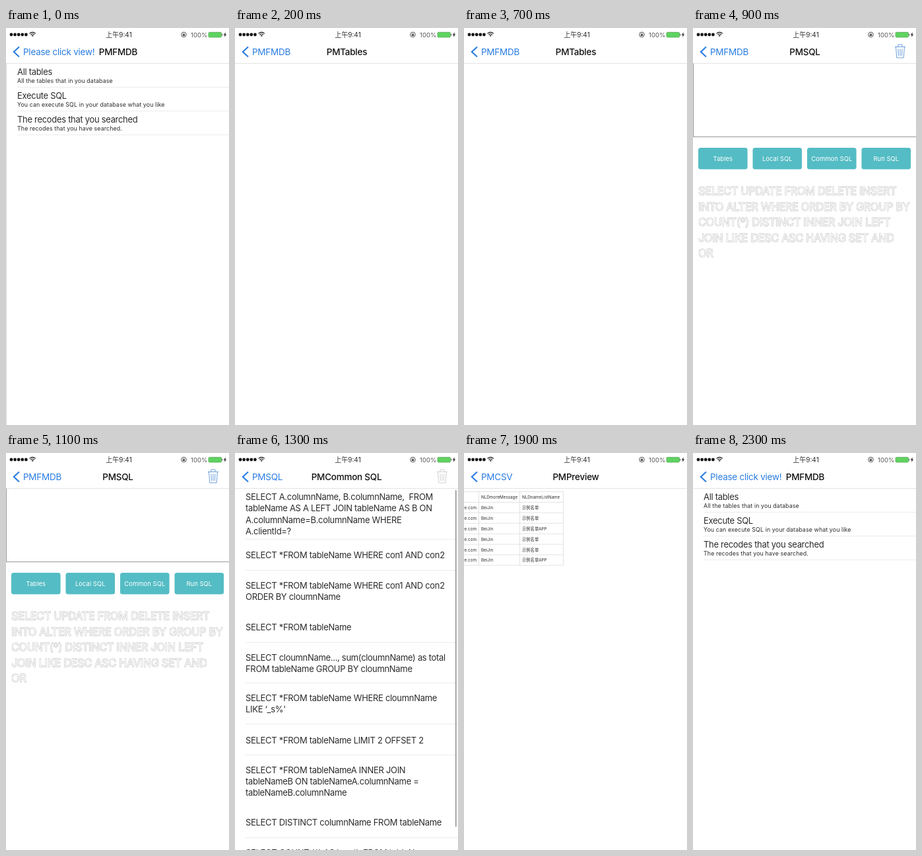
Animation, 338 px wide and 600 px high, one loop 2.4 s. Source, as an HTML page:

```html
<!DOCTYPE html>
<html lang="en">
<head>
<meta charset="utf-8">
<title>Database browser demo</title>
<style>
html, body { margin: 0; width: 100%; height: 100%; overflow: hidden; background: #fff; }
svg { display: block; width: 338px; height: 600px; }
text { font-family: Inter, "Noto Sans CJK SC", "Noto Sans CJK", sans-serif; white-space: pre; fill: #2c2c2c; }
.nav { font-size: 13.5px; letter-spacing: -.25px; }
.title { font-weight: 500; text-anchor: middle; fill: #111; }
.back { fill: #2a7de1; }
.row { font-size: 13px; letter-spacing: -.31px; }
.sub { font-size: 8.9px; letter-spacing: .09px; }
.cell { font-size: 6.3px; }
.mid { text-anchor: middle; }
.button { font-size: 9.5px; text-anchor: middle; fill: #fff; }
.keyword { font-size: 16px; letter-spacing: -.13px; fill: #fff; stroke: #acacb0; stroke-width: .9px; paint-order: stroke; }
</style>
</head>
<body>
<svg id="stage" viewBox="0 0 338 600" xmlns="http://www.w3.org/2000/svg"></svg>
<script>
const LOOP = 2400, STEP = 100;
const BLUE = '#2a7de1', GRAY = '#8c8c8c', PALE = '#e8e8ea';
const stage = document.getElementById('stage');

const text = (x, y, cls, str, extra = '') => `<text x="${x}" y="${y}" class="${cls}" ${extra}>${str}</text>`;
const path = (d, color, width = 1) =>
  `<path d="${d}" fill="none" stroke="${color}" stroke-width="${width}"/>`;
const rect = (x, y, w, h, fill, r = 0) =>
  `<rect x="${x}" y="${y}" width="${w}" height="${h}" rx="${r}" fill="${fill}"/>`;
const each = (list, draw) => list.map(draw).join('');

const lens = (x, y, r, color, width) =>
  `<circle cx="${x}" cy="${y}" r="${r}" fill="none" stroke="${color}" stroke-width="${width}"/>` +
  path(`M${x + r * .72} ${y + r * .72}l${r * .95} ${r * .95}`, color, width);

const trash = color => path(
  'M306 28.5h16M311 28v-3h6v3M307.5 28.5l1.3 16.5h10.4l1.3-16.5M311 31.5l.5 10.5M314 31.5v10.5M317 31.5l-.5 10.5',
  color, 1);

function statusBar() {
  const dots = each([8, 13.6, 19.2, 24.8, 30.4], x => `<circle cx="${x}" cy="10" r="2.4" fill="#111"/>`);
  return rect(0, 0, 338, 18, '#fff') + dots +
    path('M35.6 8.4Q40.2 4.4 44.8 8.4M37.4 10.2Q40.2 7.8 43 10.2', '#111', 1.2) +
    '<path d="M38.6 11.3Q40.2 10 41.8 11.3L40.2 13Z" fill="#111"/>' +
    text(171, 13.6, 'mid', '上午9:41', 'font-size="10"') +
    '<circle cx="269.5" cy="10" r="3.8" fill="none" stroke="#444" stroke-width=".9"/>' +
    rect(267.8, 9.4, 3.4, 2.6, '#444') + path('M268.5 9.5v-1q1-1.3 2 0v1', '#444', .7) +
    text(280, 13.5, '', '100%', 'font-size="9.6" style="fill:#555"') +
    '<rect x="307" y="6.4" width="19.5" height="7.6" rx="1.5" fill="#5fd35f" stroke="#58a75c" stroke-width=".8"/>' +
    rect(327.1, 8.8, 1.2, 2.8, '#777') +
    '<path d="M332.8 6.2L329.8 10.6H331.7L330.9 14L334.2 9.4H332.2Z" fill="#222"/>';
}

function navBar({ back, title, center = 169.5, icon = '', fading = false }) {
  return rect(0, 18, 338, 35, '#fff') + path('M0 53.5H338', '#dcdcde', .8) +
    path('M20 28.5L11.8 36L20 43.5', fading ? '#b5d3f5' : BLUE, 2.1) +
    text(fading ? 28 : 26, 40.8, 'nav back', back) +
    text(center, 40.8, 'nav title', title) + icon;
}

function menuBody() {
  const rows = [
    ['All tables', 'All the tables that in you database'],
    ['Execute SQL', 'You can execute SQL in your database what you like'],
    ['The recodes that you searched', 'The recodes that you have searched.']
  ];
  return each(rows, ([head, sub], i) => {
    const y = 71.3 + i * 36;
    return text(16, y, 'row', head) + text(16, y + 11.7, 'sub', sub) +
      path(`M16 ${y + 18.2}H340`, PALE, .8);
  });
}

function table(dx, dy) {
  const edges = [-11, 54, 116, 182], rowHeight = 15.9, top = 94.5;
  const rows = [['NLDname', 'NLDmoreMessage', 'NLDnameListName']];
  for (let i = 0; i < 6; i++)
    rows.push(['mail@example.com', 'BeiJin', '示例名单' + (i % 3 === 2 ? 'APP' : '')]);
  let out = each(edges, x => path(`M${x - .5} ${top}v${rowHeight * 7}`, '#dcdcdc', .8));
  for (let i = 0; i <= 7; i++)
    out += path(`M${edges[0]} ${top + i * rowHeight}H181.5`, '#dcdcdc', .8);
  out += each(rows, (cells, i) =>
    each(cells, (str, c) => text(edges[c] + 3, 105 + i * rowHeight, 'cell', str)));
  return `<g transform="translate(${dx} ${dy})">${out}</g>`;
}

function detailBody() {
  return path('M.5 53.5V89.5H337.5V53.5ZM117.5 57V86M185.5 57V86M269.5 57V86', GRAY, .9) +
    text(58.5, 74.8, 'mid', 'Cloumn', 'font-size="8.5"') +
    text(152, 74.8, 'mid', 'Condition', 'font-size="8.5"') +
    text(227.7, 75.5, 'mid', 'Value', 'font-size="11.2" style="fill:#c6c6ca"') +
    lens(303.5, 70.5, 3.6, '#c6c6ca', 1.1) + table(0, 0) +
    rect(333.7, 93, 2.2, 285, '#a9a9a9', 1) + rect(109, 597, 188, 2.2, '#a9a9a9', 1);
}

function sqlBody() {
  const keywords = [
    'SELECT UPDATE FROM DELETE INSERT', 'INTO ALTER WHERE ORDER BY GROUP BY',
    'COUNT(*) DISTINCT INNER JOIN LEFT', 'JOIN LIKE DESC ASC HAVING SET AND', 'OR'
  ];
  return path('M.5 53V164.5H340', GRAY, .9) +
    each(['Tables', 'Local SQL', 'Common SQL', 'Run SQL'], (label, i) => {
      const x = 8 + i * 82.5;
      return rect(x, 181, 74.6, 32.5, '#54bcc4', 3.5) + text(x + 37.3, 200.8, 'button', label);
    }) +
    each(keywords, (line, i) => text(8.3, 252 + i * 23.5, 'keyword', line));
}

function commonBody() {
  const blocks = [
    [71.3, 'SELECT A.columnName, B.columnName,  FROM', 'tableName AS A LEFT JOIN tableName AS B ON',
      'A.columnName=B.columnName WHERE', 'A.clientId=?'],
    [158.8, 'SELECT *FROM tableName WHERE con1 AND con2'],
    [204.6, 'SELECT *FROM tableName WHERE con1 AND con2', 'ORDER BY cloumnName'],
    [267.8, 'SELECT *FROM tableName'],
    [313.6, 'SELECT cloumnName..., sum(cloumnName) as total', 'FROM tableName GROUP BY cloumnName'],
    [375.3, 'SELECT *FROM tableName WHERE cloumnName', 'LIKE ‘_s%\''],
    [438.5, 'SELECT *FROM tableName LIMIT 2 OFFSET 2'],
    [483.5, 'SELECT *FROM tableNameA INNER JOIN', 'tableNameB ON tableNameA.columnName =', 'tableNameB.columnName'],
    [562.5, 'SELECT DISTINCT columnName FROM tableName'],
    [608.5, 'SELECT COUNT (*) AS length FROM tableName']
  ];
  return each(blocks, ([y, ...lines]) =>
      each(lines, (line, i) => text(16, y + i * 17.1, 'row', line))) +
    each([130.5, 177.5, 286.5, 347.5, 409.5, 456.5, 581.5], y => path(`M16 ${y}H338`, PALE, .8)) +
    rect(333.7, 56, 2.2, 509, '#a9a9a9', 1);
}

const sqlNav = { back: 'PMFMDB', title: 'PMSQL', icon: trash('#6d9fdc') };
const screens = {
  menu: [menuBody(), { back: 'Please click view!', title: 'PMFMDB', center: 170 }],
  tables: ['', { back: 'PMFMDB', title: 'PMTables' }],
  detail: [detailBody(), { back: 'PMTables', title: 'PMDetail', icon: lens(312.8, 33.5, 5.4, BLUE, 1.1) }],
  sql: [sqlBody(), sqlNav],
  sqlReturn: [sqlBody(), { ...sqlNav, fading: true }],
  common: [commonBody(), { back: 'PMSQL', title: 'PMCommon SQL', center: 169, icon: trash('#d2d2d4') }],
  csv: ['', { back: 'PMFMDB', title: 'PMCSV' }],
  preview: [table(-31, -36), { back: 'PMCSV', title: 'PMPreview' }]
};

// Start time, screen, and how far the page still is from rest.
const timeline = [
  [0, 'menu', 1], [100, 'menu', 0], [200, 'tables', 0], [400, 'detail', 0],
  [700, 'tables', 0], [800, 'menu', 0], [900, 'sql', 0], [1200, 'common', 0],
  [1500, 'sqlReturn', 1], [1600, 'sql', 0], [1700, 'menu', 0], [1800, 'csv', 0],
  [1900, 'preview', 0], [2100, 'csv', 0], [2200, 'menu', 0]
];

stage.innerHTML = rect(0, 0, 338, 600, '#fff') +
  each(Object.entries(screens), ([name, [body, nav]]) =>
    `<g id="${name}" display="none"><g class="page">${body}</g>${navBar(nav)}</g>`) +
  `<g id="edge">${path('M.5 54V600', '#d9d9d9', 1)}</g>` + statusBar();

const groups = Object.fromEntries(Object.keys(screens).map(name => [name, document.getElementById(name)]));
const edge = document.getElementById('edge');

function render(ms) {
  const t = Math.floor((ms % LOOP) / STEP) * STEP;
  const [, current, shift] = timeline.filter(([start]) => start <= t).pop();
  for (const name in groups)
    groups[name].setAttribute('display', name === current ? 'inline' : 'none');
  groups[current].querySelector('.page').setAttribute('transform', `translate(${shift} 0)`);
  edge.setAttribute('display', shift ? 'inline' : 'none');
}

const begin = performance.now();
function tick() {
  render(performance.now() - begin);
  requestAnimationFrame(tick);
}
tick();
</script>
</body>
</html>
```
